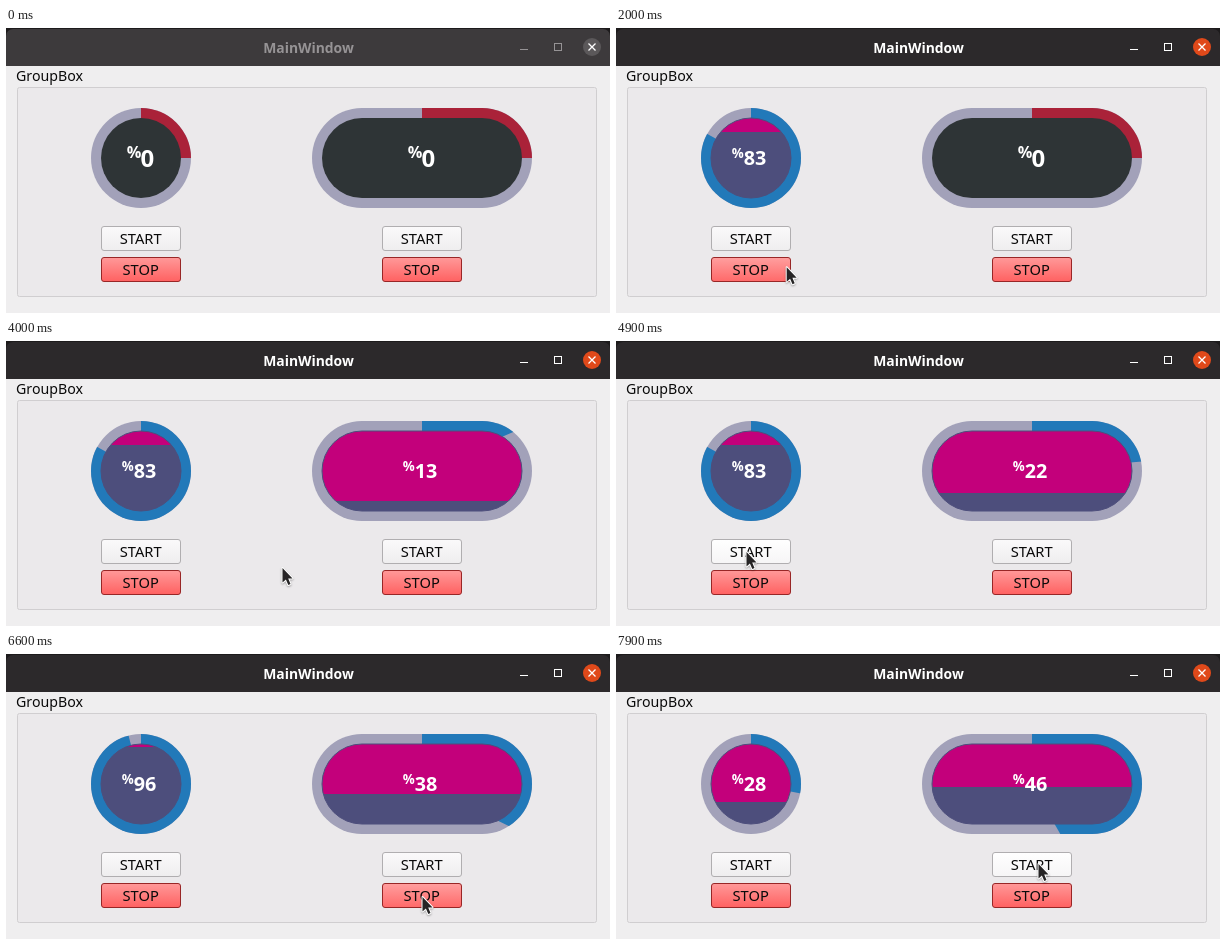
Recreate the animation shown at these times as an HTML page with a canvas. Size 604 by 285 pixels, loop 8 s.

```html
<!DOCTYPE html>
<html lang="en">
<head>
<meta charset="utf-8">
<title>MainWindow</title>
<style>
  html, body { margin: 0; width: 100%; height: 100%; overflow: hidden; background: #efeeef; }
  canvas { display: block; width: 604px; height: 285px; }
</style>
</head>
<body>
<canvas id="stage"></canvas>
<script>
const LOOP = 8000, STEP = 100, ACTIVATE = 800, CURSOR_IN = 300;
const FONT = '"Noto Sans", "Open Sans", sans-serif';
const INK = '#0a0a0a';
const canvas = document.getElementById('stage');
const ratio = window.devicePixelRatio || 1;
canvas.width = 604 * ratio;
canvas.height = 285 * ratio;
const ctx = canvas.getContext('2d');
ctx.scale(ratio, ratio);

// Each run counts up evenly between a click on START and the next STOP.
const gauges = [
  { center: 135, width: 100, runs: [
    { start: 900, stop: 1700, gain: 83 },
    { start: 5360, stop: 6600, gain: 113 },
    { start: 6600, stop: 7900, gain: 132 }] },
  { center: 416, width: 220, runs: [
    { start: 2700, stop: 6800, gain: 40.4 },
    { start: 7300, stop: 7900, gain: 5.9 }] }
];

const entry = { x: 240, y: 282 };
const glides = [
  { leave: 300, arrive: 900, x: 140, y: 212 },
  { leave: 1100, arrive: 1600, x: 134, y: 242 },
  { leave: 1900, arrive: 2400, x: 482, y: 206 },
  { leave: 2500, arrive: 2700, x: 418, y: 210 },
  { leave: 3300, arrive: 4000, x: 276, y: 226 },
  { leave: 4000, arrive: 4700, x: 130, y: 210 },
  { leave: 5300, arrive: 5700, x: 297, y: 246 },
  { leave: 6000, arrive: 6600, x: 416, y: 242 },
  { leave: 7000, arrive: 7300, x: 422, y: 209 }
];

function progress(time, from, to) {
  return Math.min(1, Math.max(0, (time - from) / (to - from)));
}

function cursorAt(time) {
  return glides.reduce((spot, glide) => {
    const p = progress(time, glide.leave, glide.arrive);
    const eased = p * p * (3 - 2 * p);
    return {
      x: spot.x + (glide.x - spot.x) * eased,
      y: spot.y + (glide.y - spot.y) * eased
    };
  }, entry);
}

function countAt(runs, time) {
  const total = runs.reduce((sum, run) => sum + run.gain * progress(time, run.start, run.stop), 0);
  return Math.round(total) % 100;
}

function rect(x, y, w, h, color) {
  ctx.fillStyle = color;
  ctx.fillRect(x, y, w, h);
}

function roundRect(x, y, w, h, radius, fill, border) {
  ctx.beginPath();
  ctx.roundRect(x, y, w, h, radius);
  ctx.fillStyle = fill;
  ctx.fill();
  if (!border) return;
  ctx.lineWidth = 1;
  ctx.strokeStyle = border;
  ctx.stroke();
}

function text(string, x, y, size, color, align = 'left', weight = 700) {
  ctx.font = `${weight} ${size}px ${FONT}`;
  ctx.textAlign = align;
  ctx.fillStyle = color;
  ctx.fillText(string, x, y);
}

function verticalGradient(top, bottom, ...stops) {
  const gradient = ctx.createLinearGradient(0, top, 0, bottom);
  stops.forEach(([offset, color]) => gradient.addColorStop(offset, color));
  return gradient;
}

function drawTitleBar(active) {
  const ink = active ? '#ffffff' : '#969395';
  rect(0, 0, 604, 38, '#1d1b1c');
  roundRect(0, 1, 604, 37, [7, 7, 0, 0], active ? '#2c292b' : '#3d3a3c');
  text('MainWindow', 302.5, 25, 13.9, ink, 'center');
  rect(514, 21, 8, 1, ink);
  ctx.lineWidth = 1;
  ctx.strokeStyle = ink;
  ctx.strokeRect(548.5, 15.5, 7, 7);
  roundRect(577, 10, 18, 18, 9, active ? '#e0491a' : '#5b585a');
  ctx.beginPath();
  for (const side of [-3.5, 3.5]) {
    ctx.moveTo(586 - side, 15.5);
    ctx.lineTo(586 + side, 22.5);
  }
  ctx.lineWidth = 1.3;
  ctx.strokeStyle = '#ffffff';
  ctx.stroke();
}

function drawRing(center, width, share, color) {
  ctx.save();
  roundRect(center - width / 2, 80, width, 100, 50, '#a2a1b9');
  ctx.clip();
  // Stretching the pie turns its angles into those of an ellipse.
  ctx.translate(center, 130);
  ctx.scale(width / 100, 1);
  ctx.beginPath();
  ctx.moveTo(0, 0);
  ctx.arc(0, 0, 100, -Math.PI / 2, (share * 2 - 0.5) * Math.PI);
  ctx.fillStyle = color;
  ctx.fill();
  ctx.restore();
}

function drawGauge({ center, width, runs }, time) {
  const started = time >= runs[0].start;
  const value = countAt(runs, time);
  const inner = [center - width / 2 + 10, 90, width - 20, 80, 40];
  if (!started) {
    drawRing(center, width, 0.25, '#aa2239');
    roundRect(...inner, '#2e3436');
    text('%', center - 14.3, 130, 16.2, '#ffffff');
    text('0', center - 0.5, 138.5, 24, '#ffffff');
    return;
  }
  drawRing(center, width, value / 100, '#2279b9');
  const level = 1 - Math.round(value * 0.8) / 80;
  const liquid = verticalGradient(90, 170, [level, '#c3007b'], [level, '#4d4e7c']);
  roundRect(...inner, liquid, '#4d4e7c');
  const shift = value < 10 ? 5.6 : 0;
  text('%', center - 19.2 + shift, 129.5, 13.3, '#ffffff');
  text(value, center - 7.2 + shift, 137, 19.8, '#ffffff');
}

const startLook = { label: 'START', top: 198, border: '#b0aeb0',
  normal: ['#fbfafb', '#eeedee'], hover: ['#ffffff', '#f6f5f6'] };
const stopLook = { label: 'STOP', top: 229, border: '#982626',
  normal: ['#ff9a9a', '#ff6060'], hover: ['#ffa0a0', '#ff6868'] };

function drawButton(center, pointer, { label, top, border, normal, hover }) {
  const hovered = pointer && Math.abs(pointer.x - center) < 40 &&
    pointer.y >= top && pointer.y < top + 25;
  const [light, dark] = hovered ? hover : normal;
  const shade = verticalGradient(top, top + 25, [0, light], [1, dark]);
  roundRect(center - 39.5, top + 0.5, 79, 24, 2.5, shade, border);
  text(label, center - 0.3, top + 18, 14.7, INK, 'center', 500);
}

function drawCursor({ x, y }) {
  const arrow = new Path2D('M0 0V14.5L3.4 11.5L5.8 17L8 16L5.7 10.6L10 10.4Z');
  ctx.save();
  ctx.translate(x + 0.5, y + 1);
  ctx.lineJoin = 'round';
  ctx.lineWidth = 2;
  ctx.strokeStyle = '#ffffff';
  ctx.shadowColor = 'rgba(0, 0, 0, 0.3)';
  ctx.shadowBlur = 2 * ratio;
  ctx.shadowOffsetY = ratio;
  ctx.stroke(arrow);
  ctx.shadowColor = 'transparent';
  ctx.fillStyle = '#262425';
  ctx.fill(arrow);
  ctx.restore();
}

function draw(time) {
  const pointer = time >= CURSOR_IN ? cursorAt(time) : null;
  rect(0, 0, 604, 285, '#efeeef');
  drawTitleBar(time >= ACTIVATE);
  text('GroupBox', 10, 53, 14.2, INK, 'left', 500);
  roundRect(11.5, 59.5, 579, 209, 2, '#ebe9eb', '#d0ced0');
  for (const gauge of gauges) {
    drawGauge(gauge, time);
    drawButton(gauge.center, pointer, startLook);
    drawButton(gauge.center, pointer, stopLook);
  }
  if (pointer) drawCursor(pointer);
}

const begin = performance.now();
function tick() {
  const time = (performance.now() - begin) % LOOP;
  draw(Math.floor(time / STEP) * STEP);
  requestAnimationFrame(tick);
}
tick();
</script>
</body>
</html>
```
